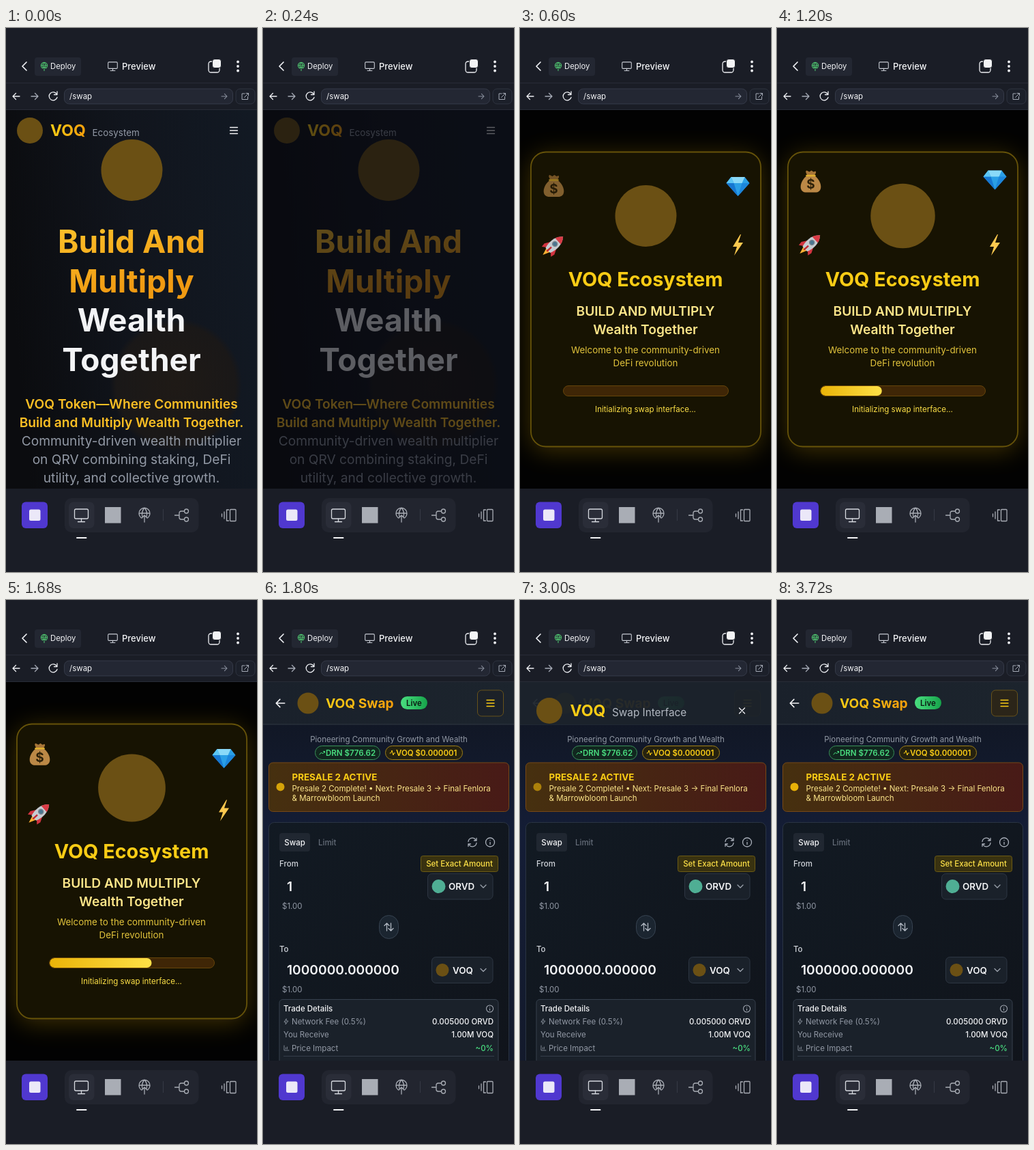
An HTML page for the animation above (3840 ms loop, 368 px wide and 796 px high).

```html
<!DOCTYPE html>
<html lang="en">
<head>
<meta charset="utf-8">
<title>Swap preview</title>
<style>
html, body { margin: 0; width: 100%; height: 100%; overflow: hidden; background: #1a1d26; }
svg { display: block; width: 100vw; height: 100vh; font-family: Inter, sans-serif; }
text { fill: #f3f4f6; white-space: pre; }
.xs { font-size: 11.5px; }
.sm { font-size: 13.4px; }
.lg { font-size: 19.17px; }
.xl { font-size: 23px; }
.hero { font-size: 46px; font-weight: 700; }
.m { font-weight: 500; }
.s { font-weight: 600; }
.b { font-weight: 700; }
.c { text-anchor: middle; }
.r { text-anchor: end; }
.gray { fill: #9299a5; }
.light { fill: #d1d5db; }
.amber { fill: #fbbf24; }
.yel { fill: #facc15; }
.pale { fill: #fde047; }
.cream { fill: #fde68a; }
.dim { fill: #e2c43c; }
.green { fill: #4ade80; }
.grad { fill: url(#gold); }
.down { fill: url(#goldDown); }
.coin { fill: #6b5014; }
.i { fill: none; stroke: currentColor; stroke-width: var(--w, 1.3); stroke-linecap: round; stroke-linejoin: round; }
</style>
</head>
<body>
<svg viewBox="0 0 368 796" preserveAspectRatio="none">
<defs>
  <linearGradient id="gold"><stop stop-color="#facc15"/><stop offset="1" stop-color="#f59e0b"/></linearGradient>
  <linearGradient id="goldDown" gradientUnits="userSpaceOnUse" x1="90" y1="290" x2="120" y2="400">
    <stop stop-color="#fbc02a"/><stop offset="1" stop-color="#f09a12"/></linearGradient>
  <linearGradient id="fillBar"><stop stop-color="#eab308"/><stop offset="1" stop-color="#fde047"/></linearGradient>
  <linearGradient id="live"><stop stop-color="#4ade80"/><stop offset="1" stop-color="#16a34a"/></linearGradient>
  <linearGradient id="alert"><stop stop-color="#46300f"/><stop offset="1" stop-color="#481a17"/></linearGradient>
  <linearGradient id="homeBg" y1=".35" y2=".2"><stop stop-color="#0b0c0f"/><stop offset=".5" stop-color="#11151d"/><stop offset="1" stop-color="#121923"/></linearGradient>
  <linearGradient id="swapBg" x2="0" y2="1"><stop stop-color="#10151f"/><stop offset=".4" stop-color="#141d36"/><stop offset="1" stop-color="#131a2c"/></linearGradient>
  <linearGradient id="panel" x2="1" y2="1"><stop stop-color="#121a23"/><stop offset="1" stop-color="#10141b"/></linearGradient>
  <linearGradient id="bar"><stop stop-color="#1a212b"/><stop offset="1" stop-color="#1c242d"/></linearGradient>
  <radialGradient id="halo"><stop stop-color="#1f1a16"/><stop offset=".9" stop-color="#1a1818"/><stop offset="1" stop-color="#1a1818" stop-opacity="0"/></radialGradient>
  <filter id="blur" x="-30%" y="-30%" width="160%" height="160%"><feGaussianBlur stdDeviation="18"/></filter>
  <clipPath id="track"><rect x="64" y="524" width="241" height="14" rx="7"/></clipPath>
  <g id="screen" class="i"><rect x="-10" y="-9" width="20" height="14" rx="2"/><path d="M0 5v4M-5 9.5h10"/></g>
  <g id="globe" class="i"><path d="M-5 4.5A8 8 0 1 1 5 4.5M-8-2h16M-3 3q-2-7 3-13q5 6 3 13M0 11V1M-4 5l4-4 4 4"/></g>
  <path id="burger" class="i" d="M-5.5-4.5h11M-5.5 0h11M-5.5 4.5h11"/>
  <path id="chev" class="i" d="M-4-2l4 4 4-4"/>
  <g id="info" class="i"><circle r="6.5"/><path d="M0 0v3M0-3v.1"/></g>
  <path id="sync" class="i" d="M-6-1a6 6 0 0 1 11-2.5M6-6v3.5H2.5M6 1a6 6 0 0 1-11 2.5M-6 6V2.5h3.5"/>
  <path id="arrow" class="i" d="M5 0H-5M-.5-4.5L-5 0l4.5 4.5"/>
</defs>

<rect y="120" width="368" height="554" fill="#080910"/>

<g id="home">
  <rect y="120" width="368" height="554" fill="url(#homeBg)"/>
  <circle cx="249" cy="522" r="97" fill="url(#halo)"/>
  <circle class="coin" cx="35" cy="150" r="19"/>
  <text class="xl b grad" x="65" y="158">VOQ</text>
  <text class="sm gray" x="126.5" y="158">Ecosystem</text>
  <use href="#burger" x="334" y="150" color="#f3f4f6"/>
  <circle class="coin" cx="184.5" cy="208" r="45"/>
  <g class="hero c">
    <text class="down" x="184" y="329.3">Build And</text>
    <text class="down" x="184" y="386.8">Multiply</text>
    <text x="184" y="444.3">Wealth</text>
    <text x="184" y="501.8">Together</text>
  </g>
  <g class="lg c">
    <text class="s amber" x="184" y="557">VOQ Token—Where Communities</text>
    <text class="s amber" x="184" y="584">Build and Multiply Wealth Together.</text>
    <text class="gray" x="184" y="611">Community-driven wealth multiplier</text>
    <text class="gray" x="184" y="638">on QRV combining staking, DeFi</text>
    <text class="gray" x="184" y="664.5">utility, and collective growth.</text>
  </g>
</g>

<g id="load">
  <rect y="120" width="368" height="554" fill="#020202"/>
  <rect x="16" y="187" width="337" height="431" rx="22" fill="#eab308" opacity=".27" filter="url(#blur)"/>
  <rect x="16" y="181.5" width="337" height="431" rx="22" fill="#171302" stroke="#665309" stroke-width="1.8"/>
  <g id="bag">
    <path d="M-5-9C-17 0-18 15-8 16H8C18 15 17 0 5-9Z" fill="#bb8846"/>
    <path d="M-5-9q-4-6-1-7l4 2 3-2 3 2 3-1q2 2-2 6Z" fill="#a87638"/>
    <path d="M-6-8.5H6" stroke="#e0b02e" stroke-width="2.5" stroke-linecap="round"/>
    <text class="c b" y="11" font-size="19" style="fill:#2e2109">$</text>
  </g>
  <g id="gem">
    <path d="M-10-13H10L17-4 0 15-17-4Z" fill="#2a9fe6"/>
    <path d="M-10-13H10L6-4H-6Z" fill="#8ad9f8"/>
    <path d="M-17-4H-6L0 15Z" fill="#1677d2"/>
    <path d="M-10-13-6-4H-17Z" fill="#5cc6f5"/>
    <path d="M6-4H17L0 15Z" fill="#1c86dc"/>
  </g>
  <g id="rocket"><g transform="rotate(48)">
    <path d="M-4 10L0 21 4 10Z" fill="#fbb034"/>
    <path d="M-6-1-11 8-10 14-4 9ZM6-1 11 8 10 14 4 9Z" fill="#d13440"/>
    <path d="M0-19C9-10 8 2 5 11H-5C-8 2-9-10 0-19Z" fill="#c6cbd1"/>
    <path d="M0-19Q5-14 6-9H-6Q-5-14 0-19Z" fill="#d93b46"/>
    <circle cy="-3" r="3.5" fill="#4a7590" stroke="#77838e" stroke-width="1.5"/>
    <path d="M0 4v9" stroke="#c42834" stroke-width="2.5"/>
  </g></g>
  <path id="bolt" d="M4-16-7 2H-1L-5 15 8-4H1L5-16Z" fill="#fdc94f"/>
  <circle id="coin" class="coin" cx="184.5" cy="275" r="45"/>
  <text class="c b yel" x="184" y="378" font-size="28.75">VOQ Ecosystem</text>
  <g class="lg c s">
    <text class="cream" x="184" y="421">BUILD AND MULTIPLY</text>
    <text class="cream" x="184" y="447.5">Wealth Together</text>
  </g>
  <g class="sm c">
    <text class="dim" x="184" y="475.5">Welcome to the community-driven</text>
    <text class="dim" x="184" y="494.5">DeFi revolution</text>
  </g>
  <rect x="63.5" y="523.5" width="242" height="15" rx="7.5" fill="#3f2606" stroke="#66440a"/>
  <g clip-path="url(#track)"><rect id="fill" x="64" y="524" height="14" rx="7" fill="url(#fillBar)"/></g>
  <text class="xs c pale" x="184" y="561.5">Initializing swap interface...</text>
</g>

<g id="swap">
  <rect y="120" width="368" height="554" fill="url(#swapBg)"/>
  <rect y="120" width="368" height="62" fill="url(#bar)"/>
  <path d="M0 182h368" stroke="#303843"/>
  <use href="#arrow" color="#f3f4f6" transform="translate(25.5 151) scale(1.25)"/>
  <circle class="coin" cx="66" cy="151" r="15.5"/>
  <text class="lg b grad" x="92" y="158">VOQ Swap</text>
  <rect x="202" y="141" width="39" height="19" rx="9.5" fill="url(#live)"/>
  <text class="xs c s" x="221.5" y="154.8" style="fill:#0c1913">Live</text>
  <rect id="toggle" x="314.5" y="132" width="38" height="38" rx="6" stroke="#67521a"/>
  <use href="#burger" x="333.5" y="151" color="#facc15"/>

  <g id="menu">
    <rect y="120" width="368" height="62" fill="#1b222b" opacity=".94"/>
    <circle class="coin" cx="43" cy="162" r="19"/>
    <text class="xl b yel" x="73.5" y="170">VOQ</text>
    <text x="135" y="170" font-size="15.3" style="fill:#b3b9c2">Swap Interface</text>
    <path class="i" color="#f3f4f6" d="M321.5 158l8 8m0-8l-8 8"/>
  </g>

  <text class="xs c gray" x="184.5" y="207.5">Pioneering Community Growth and Wealth</text>
  <rect x="76.5" y="213.5" width="95" height="20" rx="10" fill="#11271f" stroke="#3a9159"/>
  <path class="i" color="#4ade80" style="--w:1" d="M83 226l2.5-3 2 2 3-3.5m-2 0h2v2"/>
  <text class="xs s green" x="92" y="227.5">DRN $776.62</text>
  <rect x="179.5" y="213.5" width="113" height="20" rx="10" fill="#26220f" stroke="#a08018"/>
  <path class="i" color="#facc15" style="--w:1" d="M186 224h1.5l1.5-4 2 7 1-3h1.5"/>
  <text class="xs s yel" x="195" y="227.5">VOQ $0.000001</text>

  <rect x="8.5" y="238" width="352" height="71.5" rx="6" fill="url(#alert)" stroke="#774816"/>
  <circle id="dot" cx="25.5" cy="273.5" r="6" fill="#eab308"/>
  <text class="sm b yel" x="42.5" y="263.5">PRESALE 2 ACTIVE</text>
  <g class="xs">
    <text class="cream" x="42.5" y="279.5">Presale 2 Complete! • Next: Presale 3 → Final Fenlora</text>
    <text class="cream" x="42.5" y="294">&amp; Marrowbloom Launch</text>
  </g>

  <rect x="8.5" y="325.5" width="352" height="370" rx="8" fill="url(#panel)" stroke="#2a3443"/>
  <rect x="24" y="341" width="45" height="27" rx="4" fill="#202731"/>
  <text class="xs m c" x="46.5" y="358.5">Swap</text>
  <text class="xs m" x="81" y="358.5" style="fill:#666e7a">Limit</text>
  <g color="#aab0ba"><use href="#sync" x="307" y="354.5"/><use href="#info" x="333" y="354.5"/></g>
  <text class="xs m light" x="24" y="389.5">From</text>
  <rect x="231.5" y="374.5" width="113" height="23" rx="3" fill="#393210" stroke="#6c5b14"/>
  <text class="xs m c pale" x="288" y="390">Set Exact Amount</text>
  <text class="lg s" x="35" y="426">1</text>
  <text class="xs gray" x="28" y="451.5">$1.00</text>
  <rect x="241.5" y="400.5" width="95.5" height="37.5" rx="6" fill="#1a212a" stroke="#2d3642"/>
  <circle cx="257.5" cy="419" r="10" fill="#4fae94"/>
  <text class="sm s" x="272" y="424">ORVD</text>
  <use href="#chev" x="323" y="419" color="#9aa1ab"/>
  <rect x="170.5" y="461.5" width="28" height="34" rx="14" fill="#1b2530" stroke="#374351"/>
  <path class="i" color="#b3bac4" d="M181.5 484v-11m-3.5 3.5l3.5-3.5 3.5 3.5M187.5 473v11m-3.5-3.5l3.5 3.5 3.5-3.5"/>
  <text class="xs m light" x="24" y="514.5">To</text>
  <text class="lg s" x="35" y="548">1000000.000000</text>
  <text class="xs gray" x="28" y="573.5">$1.00</text>
  <rect x="247.5" y="522.5" width="89.5" height="38" rx="6" fill="#1a212a" stroke="#2d3642"/>
  <circle class="coin" cx="263" cy="541.5" r="9.5"/>
  <text class="sm s" x="278" y="546.5">VOQ</text>
  <use href="#chev" x="323" y="541.5" color="#9aa1ab"/>

  <rect x="24" y="584.5" width="321" height="104" rx="5" fill="#1a212a" stroke="#36404d"/>
  <use href="#info" color="#aab0ba" transform="translate(332.5 598) scale(.77)"/>
  <path class="i" color="#8b929e" style="--w:.9" d="M34 613l-3 4.5h2.5l-.5 3.5 4-5h-2.5ZM31 652v7h7M33.5 657v-2M35.5 657v-3"/>
  <g class="xs">
    <text class="m" x="30" y="602">Trade Details</text>
    <text class="gray" x="42" y="621">Network Fee (0.5%)</text>
    <text class="gray" x="30" y="640">You Receive</text>
    <text class="gray" x="42" y="659.5">Price Impact</text>
    <g class="r m">
      <text x="338" y="621">0.005000 ORVD</text>
      <text x="338" y="640">1.00M VOQ</text>
      <text class="green" x="338" y="659.5">~0%</text>
    </g>
  </g>
  <path d="M30 667.5h309" stroke="#353e4a"/>
</g>

<!-- app chrome -->
<rect width="368" height="120" fill="#1a1d26"/>
<path d="M0 80.5h368M0 119.5h368" stroke="#282c37"/>
<g color="#eef0f4">
  <path class="i" style="--w:1.7" d="M30 50l-6 6 6 6"/>
  <rect x="42" y="43" width="68" height="27" rx="4" fill="#232732"/>
  <use href="#globe" color="#4fc46f" transform="translate(56 56) scale(.58)" style="--w:1.8"/>
  <text x="65" y="60" font-size="11.3">Deploy</text>
  <use href="#screen" color="#c8ccd4" transform="translate(156.5 56) scale(.68)" style="--w:1.6"/>
  <text class="m" x="170" y="60.5" font-size="13">Preview</text>
  <rect class="i" x="297" y="49" width="16" height="16" rx="3.5"/>
  <rect x="302.5" y="45.5" width="13" height="13" rx="3.5" fill="#f3f4f6" stroke="#1a1d26"/>
  <g fill="#eef0f4"><circle cx="340" cy="49.5" r="1.9"/><circle cx="340" cy="56" r="1.9"/><circle cx="340" cy="62.5" r="1.9"/></g>
  <use href="#arrow" x="15" y="100"/>
  <use href="#arrow" color="#a5abb6" transform="translate(42 100) scale(-1 1)"/>
  <path class="i" d="M74.5 97a6 6 0 1 0 .5 4.500M75 93v4.500h-4.500"/>
  <rect x="85.5" y="89" width="247" height="22" rx="7" fill="#232733" stroke="#353a48"/>
  <text x="93" y="104" font-size="11.5">/swap</text>
  <use href="#arrow" color="#8b92a0" transform="translate(320 100) scale(-.8 .8)"/>
  <rect x="337" y="89" width="28" height="22" rx="6" fill="#1c202a" stroke="#2f3440"/>
  <path class="i" color="#a5abb6" style="--w:1" d="M350 96h-4v8.5h8.5v-4M352 95.500h3.500v3.500M355 96l-5.500 5.500"/>
</g>

<rect y="674" width="368" height="122" fill="#1a1d26"/>
<rect x="23" y="693.5" width="38" height="38.5" rx="6" fill="#5038cf"/>
<rect x="34" y="704.5" width="16.5" height="16.5" rx="2.5" fill="#ebe8f8"/>
<rect x="86" y="688" width="196.5" height="50" rx="10" fill="#22252f"/>
<rect x="92" y="693.5" width="37.5" height="38.5" rx="7" fill="#2a2d38"/>
<use href="#screen" x="110.5" y="713" color="#d6d9df"/>
<rect x="145" y="701" width="23.5" height="23.5" fill="#a9adb5"/>
<g color="#a9adb5">
  <use href="#globe" x="203" y="712"/>
  <path d="M230.5 704v17" stroke="#363a45"/>
  <g class="i"><path d="M247.5 713h6.5M261 707h-4q-3 0-3 3v6q0 3 3 3h4"/><circle cx="264.5" cy="707" r="3"/><circle cx="264.5" cy="719" r="3"/></g>
  <g class="i"><path d="M316.5 711v4M320 708v10M326.5 705h-3v16h3"/><rect x="328.5" y="704.5" width="8.5" height="17" rx="1"/></g>
</g>
<rect x="103" y="745" width="15.5" height="2" rx="1" fill="#f3f4f6"/>
</svg>
<script>
const LOOP = 3840, STEP = 120;
const LOAD = 600, SWAP = 1800, OPEN = 2580, CLOSE = 3600, PULSE = 2400;
const el = id => document.getElementById(id);
const set = (id, name, value) => el(id).setAttribute(name, value);
const ramp = (t, a, b) => Math.min(1, Math.max(0, (t - a) / (b - a)));
const ease = x => (1 - Math.cos(Math.PI * x)) / 2;
const easeOut = x => 1 - (1 - x) ** 1.62;

const floaters = [['bag', 49.5, 231], ['gem', 319.5, 231], ['rocket', 49, 318], ['bolt', 319, 318]];

// Each floater starts a little later, then rises and sinks.
function lift(age) {
  const half = 430;
  return age < 0 ? 0 : ease(age / half);
}

function draw(t) {
  set('home', 'opacity', 1 - ramp(t, 60, 340));
  set('load', 'display', t >= LOAD && t < SWAP ? 'inline' : 'none');
  set('swap', 'display', t >= SWAP ? 'inline' : 'none');

  const age = t - LOAD;
  floaters.forEach(([id, x, y], n) => {
    const up = lift(age - n * 235);
    set(id, 'transform', `translate(${x} ${y - 10 * up})`);
  });
  set('bag', 'opacity', 0.65 + 0.35 * ramp(age, 0, 430));
  set('coin', 'r', 45 * (1 + 0.1 * ease(ramp(age, 0, 1200))));
  set('fill', 'width', 241 * easeOut(ramp(age, 0, 2400)));

  set('menu', 'opacity', Math.min(ramp(t, OPEN, OPEN + 120), 1 - ramp(t, CLOSE - 60, CLOSE + 60)));
  set('toggle', 'fill', t > OPEN ? '#2b2519' : '#1c2128');
  set('dot', 'opacity', 0.75 + 0.25 * Math.cos(2 * Math.PI * (t - 3800) / PULSE));
}

const start = performance.now();
function tick() {
  const t = (performance.now() - start) % LOOP;
  draw(Math.floor(t / STEP) * STEP);
  requestAnimationFrame(tick);
}
tick();
</script>
</body>
</html>
```
